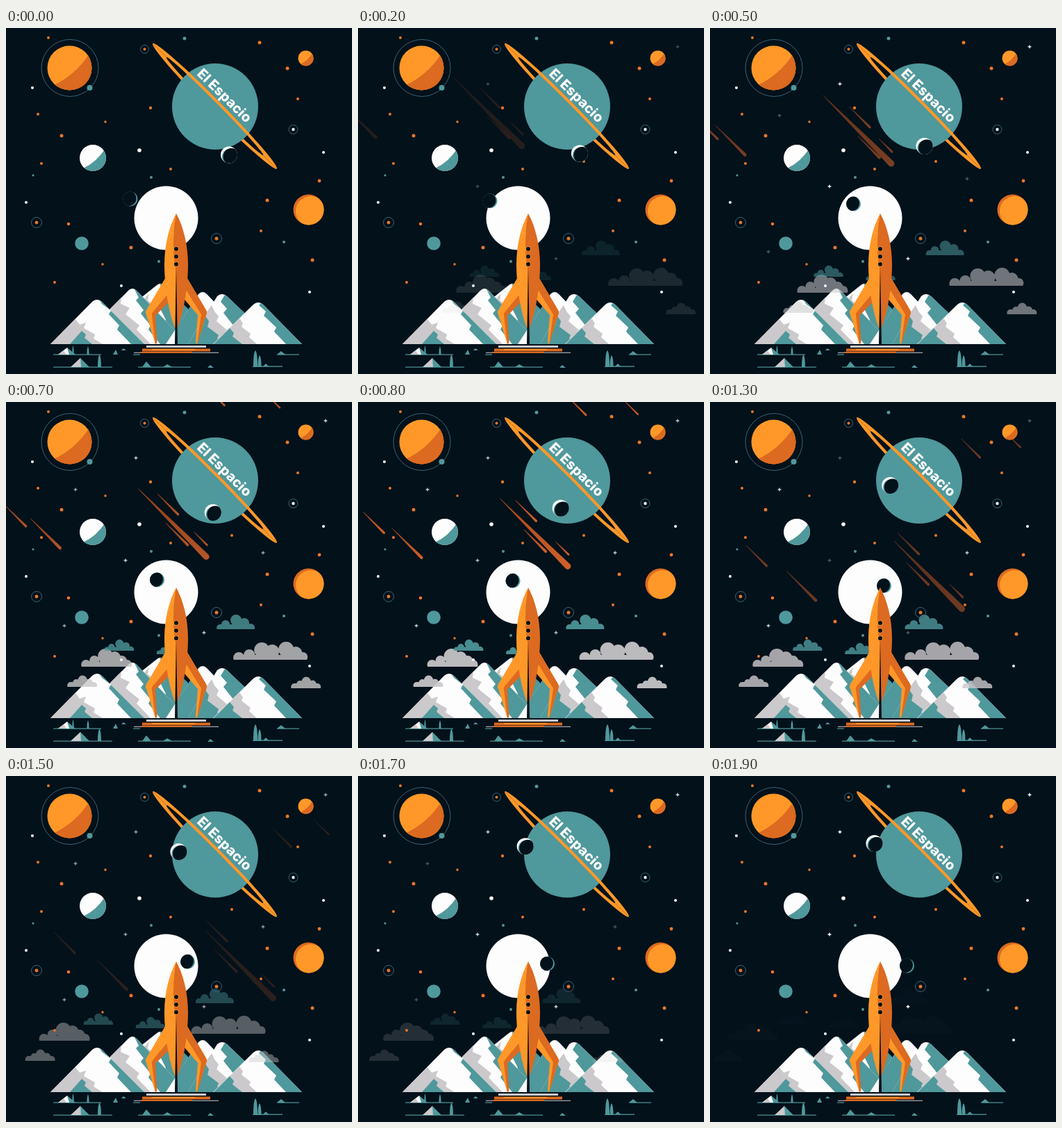
Animation of 498x498 px, one loop 2 s. Source, as an HTML page with a canvas:

```html
<!DOCTYPE html>
<html lang="es">
<head>
<meta charset="utf-8">
<title>El Espacio</title>
<style>
html, body { margin: 0; width: 100%; height: 100%; overflow: hidden; background: #03111a; }
canvas { display: block; width: 100vw; height: 100vh; }
</style>
</head>
<body>
<canvas id="stage" width="498" height="498"></canvas>
<script>
const ctx = document.getElementById('stage').getContext('2d');
const LOOP = 2000, STEP = 100, REST = 1100;
const NIGHT = '#03111a', WHITE = '#fdfdfd', GREY = '#cbc9cb', TEAL = '#4f989b';
const ORANGE = '#ff9829', RUST = '#dc6a20', ORBIT = '#3a6378';

// Linear interpolation through [time, value] pairs.
function along(keys, t) {
  if (t <= keys[0][0]) return keys[0][1];
  for (let i = 1; i < keys.length; i++) {
    const [a, u] = keys[i - 1], [b, v] = keys[i];
    if (t <= b) return u + (v - u) * (t - a) / (b - a);
  }
  return keys[keys.length - 1][1];
}

function disc(x, y, r, color) {
  ctx.fillStyle = color;
  ctx.beginPath();
  ctx.arc(x, y, r, 0, Math.PI * 2);
  ctx.fill();
}

function hoop(x, y, r, color = ORBIT) {
  ctx.strokeStyle = color;
  ctx.lineWidth = 1;
  ctx.beginPath();
  ctx.arc(x, y, r, 0, Math.PI * 2);
  ctx.stroke();
}

function poly(color, ...p) {
  ctx.fillStyle = color;
  ctx.beginPath();
  for (let i = 0; i < p.length; i += 2) ctx.lineTo(p[i], p[i + 1]);
  ctx.fill();
}

function bar(color, x, y, w, h) {
  ctx.fillStyle = color;
  ctx.fillRect(x, y, w, h);
}

function shape(color, path) {
  ctx.fillStyle = color;
  ctx.fill(new Path2D(path));
}

function inDisc(x, y, r, draw) {
  ctx.save();
  ctx.beginPath();
  ctx.arc(x, y, r, 0, Math.PI * 2);
  ctx.clip();
  draw();
  ctx.restore();
}

// Disc lit from the upper left, with a gently curved diagonal edge.
function litDisc(x, y, r, light, dark, turn) {
  disc(x, y, r, light);
  inDisc(x, y, r, () => {
    ctx.translate(x, y);
    ctx.rotate(turn);
    ctx.fillStyle = dark;
    ctx.beginPath();
    ctx.moveTo(-r * 1.1, r * 0.1);
    ctx.quadraticCurveTo(0, r * 0.42, r * 1.1, r * 0.1);
    ctx.lineTo(r * 1.1, r * 1.1);
    ctx.lineTo(-r * 1.1, r * 1.1);
    ctx.fill();
  });
}

// --- sky ---

const WHITE_DOTS = [[38, 86, 2], [192, 176, 2.8], [457, 179, 2], [29, 251, 2],
  [166, 371, 2], [437, 380, 2], [413.5, 146, 2.2]];
const ORANGE_DOTS = [[61, 14, 2], [46, 124, 2], [80, 155, 2.5], [143, 135, 1.8], [51, 195, 2],
  [90, 282, 2.3], [180, 316, 2.5], [139, 340, 1.8], [70, 366, 2], [208, 115, 2.2], [237, 203, 2],
  [365, 21, 2.5], [405, 58, 2.5], [420, 102, 2], [451, 220, 2.4], [376, 248, 2.5], [367, 292, 2],
  [441, 334, 2.5], [325, 192, 2], [199.5, 30.5, 2], [303, 303, 2.5], [44, 280, 2.4]];
const TEAL_DOTS = [[257, 15, 2.5], [39, 212, 1.6], [209, 215, 2], [220, 336, 2], [400, 308, 2]];

function dots() {
  WHITE_DOTS.forEach(d => disc(...d, WHITE));
  ORANGE_DOTS.forEach(d => disc(...d, '#e8772a'));
  TEAL_DOTS.forEach(d => disc(...d, TEAL));
  hoop(199.5, 30.5, 6);
  hoop(303, 303, 7.5);
  hoop(44, 280, 7.5);
  hoop(413.5, 146, 6.5);
}

const TWINKLE_A = [[0, 0], [200, 0.25], [500, 0.9], [800, 0.7], [1100, 0], [1500, 0.6], [1900, 1]];
const TWINKLE_B = [[200, 0], [500, 0.3], [800, 0.75], [1100, 1], [1500, 0.55], [1900, 0]];
const SPARKS_A = [[460, 27], [187, 80.5], [172, 228], [285, 332]];
const SPARKS_B = [[100, 126], [370, 217], [84, 322]];

function sparks(list, alpha) {
  ctx.globalAlpha = alpha;
  for (const [x, y] of list) {
    poly(WHITE, x, y - 3.3, x + 0.9, y - 0.9, x + 3.3, y, x + 0.9, y + 0.9,
      x, y + 3.3, x - 0.9, y + 0.9, x - 3.3, y, x - 0.9, y - 0.9);
  }
  ctx.globalAlpha = 1;
}

function ringHalf(from, to) {
  ctx.fillStyle = ORANGE;
  ctx.beginPath();
  ctx.ellipse(0, 0, 127, 9, 0, from, to);
  ctx.ellipse(0, 0, 99, 4.8, 0, to, from, true);
  ctx.fill();
}

function ringPlanet() {
  const tilted = draw => {
    ctx.save();
    ctx.translate(300.5, 112.5);
    ctx.rotate(Math.PI * 0.2517);
    draw();
    ctx.restore();
  };
  tilted(() => ringHalf(0, Math.PI));
  disc(301, 113, 62, TEAL);
  tilted(() => ringHalf(Math.PI, Math.PI * 2));
  ctx.save();
  ctx.translate(314.5, 97.2);
  ctx.rotate(Math.PI * 0.247);
  ctx.fillStyle = WHITE;
  ctx.font = '800 20px Inter, sans-serif';
  ctx.textAlign = 'center';
  ctx.textBaseline = 'alphabetic';
  ctx.fillText('El Espacio', 0, 7);
  ctx.restore();
}

function planets() {
  hoop(92, 57.5, 41);
  litDisc(91.5, 57.5, 32, ORANGE, RUST, -0.72);
  disc(120.5, 86, 4, TEAL);
  litDisc(431.5, 43.5, 11, ORANGE, RUST, -0.75);
  litDisc(125, 187, 19, WHITE, TEAL, -0.72);
  disc(109, 310, 9.8, TEAL);
  disc(435.5, 261.5, 22, RUST);
  inDisc(435.5, 261.5, 22, () => disc(438.5, 263.5, 21.5, ORANGE));
  disc(230.5, 273.5, 46, WHITE);
  ringPlanet();
}

// --- meteors and clouds, placed for t = REST ---

const TRAVEL = [[0, -114], [200, -105], [500, -80], [800, -39], [1100, 0], [1500, 43.5], [1900, 80]];
const METEOR_FADE = [[100, 0], [200, 0.17], [500, 0.58], [800, 1], [1100, 0.85], [1500, 0.2], [1700, 0]];
const CLOUD_FADE = [[100, 0], [200, 0.13], [500, 0.54], [800, 0.92], [1000, 1], [1200, 1],
  [1500, 0.42], [1800, 0.03], [1900, 0.015]];

// Tail x, tail y, length along x, head width, quick or slow.
const METEORS = [
  [243, 178, 101, 9, true], [323, 240, 20, 3, true], [88, 221, 44, 4.5, true], [340, 31, 28, 3, true],
  [253, 170, 31, 3.5, false], [265, 212, 33, 4, false], [34, 187, 31, 3.5, false], [409, 26, 21, 2.5, false]
];

function meteors(t) {
  ctx.globalAlpha = along(METEOR_FADE, t);
  for (const [x0, y0, len, width, quick] of METEORS) {
    const d = quick ? along(TRAVEL, t) : (t - REST) * 0.088;
    ctx.save();
    ctx.translate(x0 + d, y0 + d * (quick ? 1.01 : 1.08));
    ctx.rotate(Math.PI / 4);
    const end = len * Math.SQRT2, r = width / 2;
    const glow = ctx.createLinearGradient(0, 0, end, 0);
    glow.addColorStop(0, '#a8481c');
    glow.addColorStop(1, '#d0602a');
    ctx.fillStyle = glow;
    ctx.beginPath();
    ctx.moveTo(0, -0.3);
    ctx.lineTo(end - r, -r);
    ctx.arc(end - r, 0, r, -Math.PI / 2, Math.PI / 2);
    ctx.lineTo(0, 0.3);
    ctx.fill();
    ctx.restore();
  }
  ctx.globalAlpha = 1;
}

// Puffs are [x, height of centre, radius] above a flat base.
const BIG = [[9, 3, 8], [24, 7, 8], [42, 14, 11], [57, 12, 10], [77, 15, 11], [91, 10, 9], [101, 4, 7]];
const MID = [[8, 3, 7], [20, 9, 7], [36, 15, 11], [49, 13, 9], [59, 8, 8], [67, 3, 7]];
const LOW = [[6, 2, 5], [14, 6, 5], [23, 10, 6.5], [32, 6, 5.5], [39, 2, 5]];
const TALL = [[6, 2, 5], [14, 7, 6], [29, 13, 8], [41, 9, 7], [50, 2, 6]];
const CLOUDS = [
  [293, 371, BIG, 1], [74, 381, MID, 1], [54, 410, LOW, 1], [376, 412, LOW, 1],
  [287, 327, TALL, 1, TEAL], [126, 358, TALL, 0.77, TEAL], [201, 363, TALL, 0.77, TEAL]
];

function clouds(t) {
  ctx.globalAlpha = along(CLOUD_FADE, t);
  for (const [x, y, puffs, scale, tint] of CLOUDS) {
    const d = tint ? (REST - t) * 0.0377 : along(TRAVEL, t) * -0.63;
    ctx.save();
    ctx.translate(x + d, y);
    ctx.scale(scale, scale);
    ctx.beginPath();
    ctx.rect(-5, -40, 130, 40);
    ctx.clip();
    ctx.fillStyle = tint || GREY;
    ctx.beginPath();
    for (const [px, up, r] of puffs) {
      ctx.moveTo(px + r, -up);
      ctx.arc(px, -up, r, 0, Math.PI * 2);
    }
    const last = puffs[puffs.length - 1];
    ctx.rect(puffs[0][0], -7, last[0] - puffs[0][0], 7);
    ctx.fill();
    ctx.restore();
  }
  ctx.globalAlpha = 1;
}

// --- ground ---

function mountains() {
  shape(WHITE, 'M110 455L216 371Q222 365 228 371L310 455Z');
  shape(GREY, 'M186 404L206 382L204 392L212 398L208 408L222 424V455H180Z');
  shape(TEAL, 'M222 368Q226 368 229 372L262 404V455H236L224 430L230 420L220 400L225 390Z');

  shape(WHITE, 'M100 455L176 378Q182 372 188 378L262 455Z');
  shape(GREY, 'M150 404L166 388L165 397L178 403L172 412L192 428L188 434L208 455H175Z');
  shape(TEAL, 'M185 376L188 378L262 455H222L205 434L208 428L194 411L198 406L187 392L191 388Z');

  shape(WHITE, 'M230 455L277 383Q283 377 289 383L358 455Z');
  shape(TEAL, 'M262 406L276 385L274 395L282 402L279 410L296 430L292 435L312 455H246V430Z');
  shape(WHITE, 'M262 455L304 386Q311 380 318 386L390 455Z');
  shape(TEAL, 'M315 384L318 386L390 455H340L324 436L328 429L313 410L318 404L309 394Z');
  shape(GREY, 'M288 410L296 399L300 408L306 415L303 422L324 440L322 446L332 455H262Z');
  shape(TEAL, 'M278 428L286 413L292 422L290 430L306 442L304 447L314 455H262Z');

  shape(WHITE, 'M298 455L356 398Q363 392 370 398L426 455Z');
  shape(GREY, 'M326 428L336 418L341 425L339 430L352 440L350 445L361 455H298Z');
  shape(TEAL, 'M367 396L370 398L426 455H403L386 437L389 431L371 414L374 408L364 399Z');
  shape(TEAL, 'M314 440L322 432L328 439L326 444L340 455H299Z');

  shape(WHITE, 'M64 455L124 394Q131 388 138 394L199 455Z');
  shape(TEAL, 'M135 392L138 394L199 455H180L160 434L163 428L148 412L151 407L138 397Z');
  shape(GREY, 'M76 443L100 419L106 427L115 424L112 432L128 441L126 447L139 455H64Z');
  shape(TEAL, 'M92 455L109 436L115 441L113 446L124 455Z');
}

function spike(x, top, base, w) {
  ctx.fillStyle = TEAL;
  ctx.beginPath();
  ctx.moveTo(x - w, base);
  ctx.quadraticCurveTo(x - w, top + 3, x, top);
  ctx.quadraticCurveTo(x + w, top + 3, x + w, base);
  ctx.fill();
}

function water() {
  bar(TEAL, 68, 469.5, 69, 1.2);
  poly(WHITE, 75, 470, 88, 460, 96, 470);
  poly(TEAL, 88, 460, 100, 470, 91, 470);
  poly(GREY, 75, 470, 83, 464, 87, 470);
  spike(96.5, 457, 470, 1.2);
  spike(118, 458, 470, 1.5);
  bar(TEAL, 68, 487.5, 85, 1.2);
  poly(GREY, 93, 488, 107, 475, 113, 488);
  poly(TEAL, 107, 475, 120, 488, 108, 488);
  spike(134.5, 470, 488, 2.5);
  poly(TEAL, 154, 470, 158, 463, 161, 470);
  poly(TEAL, 166, 464, 169, 461, 173, 464);
  bar(TEAL, 183, 469.5, 10, 1.2);
  bar(TEAL, 190, 487.5, 76, 1.2);
  poly(TEAL, 196, 488, 202, 480, 209, 488);
  poly(TEAL, 226, 488, 232, 484, 239, 488);
  poly(TEAL, 290, 489, 294, 485, 299, 489);
  spike(359, 464, 488, 3);
  spike(365, 471, 488, 2.5);
  bar(TEAL, 355, 486.5, 43, 1.3);
  poly(TEAL, 370, 487, 374, 483, 378, 487);
  poly(TEAL, 390, 470, 396, 465, 402, 470);
  bar(TEAL, 390, 469.5, 32, 1.2);
}

function rocket() {
  shape(ORANGE, 'M231 357L202 406Q200 410 202 413L215 455L217 453L214 413L238 385Z');
  shape(RUST, 'M237 378L212 408Q209 411 210 414L215 455L217.5 453L215 414L239 390Z');
  shape(ORANGE, 'M259 357L288 406Q290 410 288 413L275 455L273 453L276 413L252 385Z');
  shape(RUST, 'M259 357L288 406Q290 410 288 413L275 455L281 412L256 372Z');
  shape(ORANGE, 'M245 267C235 285 228 312 228 340C228 372 234 408 243 432H245Z');
  shape(RUST, 'M245 267C255 285 262 312 262 340C262 372 256 408 247 432H244V345C240 330 240 292 245 267Z');
  shape(NIGHT, 'M245 346L247 455H243Z');
  for (const y of [318, 329, 340]) {
    disc(245, y, 3.8, ORANGE);
    disc(245, y, 3, NIGHT);
  }
}

function platform() {
  bar(GREY, 202, 457, 86, 3);
  bar(NIGHT, 200, 460, 92, 1.5);
  bar(RUST, 196, 461.5, 98, 4);
  bar(ORANGE, 210, 462, 62, 1.5);
  bar(GREY, 184, 466.8, 122, 1);
  bar(RUST, 194, 466, 74, 2);
}

// --- small moons ---

function shadowMoon(t) {
  const x = 179 + t * 0.055, y = 246 + t * 0.0142, r = 10.5;
  disc(x, y, r, TEAL);
  inDisc(x, y, r, () => disc(x - 2.3, y - 0.8, r + 0.3, NIGHT));
}

function crescentMoon(t) {
  const p = (1 - Math.cos(Math.PI * t / LOOP)) / 2;
  const x = 321 - 85 * p, y = 182.5 - 86 * p, r = 12;
  disc(x, y, r, WHITE);
  inDisc(x, y, r, () => {
    disc(x + 2, y + 3, r, TEAL);
    disc(x + 3.6, y + 2.6, r, NIGHT);
  });
}

function draw(now) {
  const t = Math.floor(now / STEP) * STEP % LOOP;
  bar(NIGHT, 0, 0, 498, 498);
  meteors(t);
  planets();
  mountains();
  clouds(t);
  dots();
  sparks(SPARKS_A, along(TWINKLE_A, t));
  sparks(SPARKS_B, along(TWINKLE_B, t));
  shadowMoon(t);
  crescentMoon(t);
  water();
  rocket();
  platform();
}

const start = performance.now();
function tick() {
  draw(performance.now() - start);
  requestAnimationFrame(tick);
}
tick();
</script>
</body>
</html>
```
